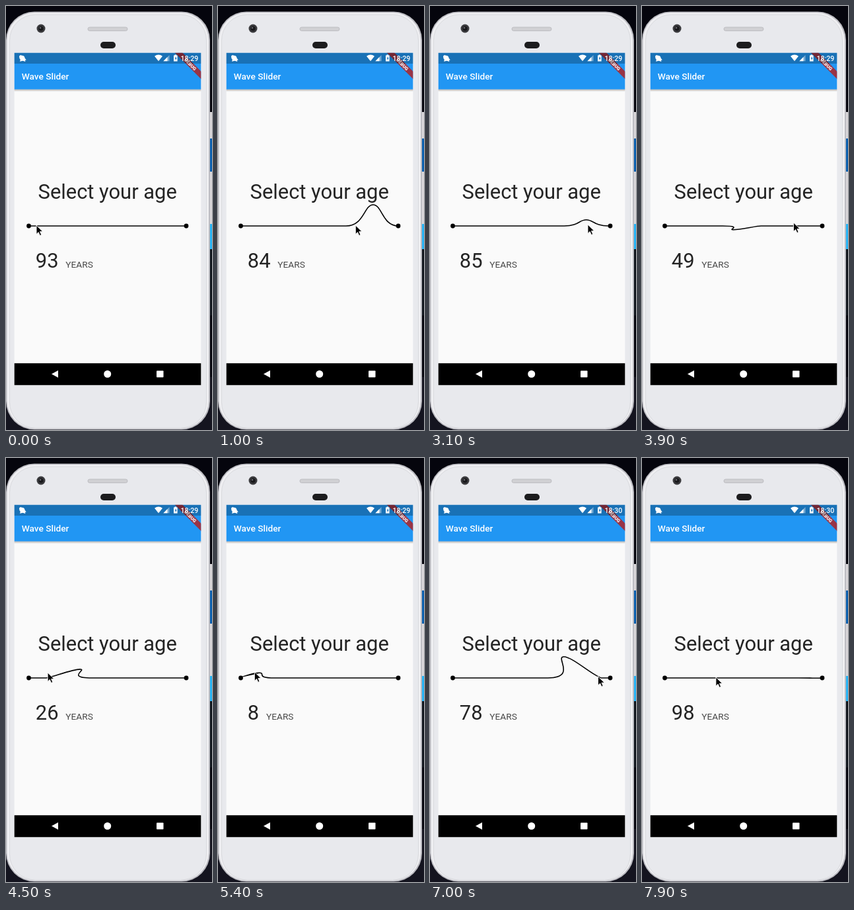
Write an HTML page that moves like this. It is 312 px wide and 640 px high and loops after 8 s.

```html
<!DOCTYPE html>
<html lang="en">
<head>
<meta charset="utf-8">
<title>Wave Slider</title>
<style>
  html, body { margin: 0; width: 100%; height: 100%; overflow: hidden; background: #05050d; }
  svg { display: block; }
  text { font-family: Roboto, "Noto Sans", sans-serif; }
</style>
</head>
<body>
<svg width="312" height="640" viewBox="0 0 312 640">
  <defs>
    <linearGradient id="shade" x2="0" y2="1">
      <stop stop-color="#000" stop-opacity=".3"/>
      <stop offset="1" stop-color="#000" stop-opacity="0"/>
    </linearGradient>
    <clipPath id="screen"><path d="M12.700 70.700h282.600v501.600H12.700z"/></clipPath>
  </defs>

  <!-- desktop and side buttons -->
  <path fill="#05050d" d="M0 0h312v640H0z"/>
  <path fill="#14141f" d="M0 560h312v80H0z"/>
  <path fill="#10151c" d="M306 367h6v100h-6z"/>
  <path fill="#0b5fae" d="M306 200h6v50h-6z"/>
  <path fill="#27b4f5" d="M306 329h6v38h-6z"/>
  <path fill="#d9d6d9" d="M306 160h6v40h-6zM306 250h6v79h-6z"/>

  <!-- phone body -->
  <rect y="8.500" width="309" height="631" rx="43" fill="#bcbcc2"/>
  <rect x="1.500" y="10" width="305.500" height="628" rx="42" fill="#efeff2"/>
  <rect x="5.500" y="13" width="298" height="624" rx="39" fill="#e8e9ed" stroke="#d9dade"/>
  <circle cx="53" cy="34" r="6.500" fill="#3a3a3d"/>
  <circle cx="53" cy="34" r="3.600" fill="#18181b"/>
  <circle cx="52" cy="33" r="1.300" fill="#65656c"/>
  <rect x="124" y="32" width="60" height="5.500" rx="2.700" fill="#d0d0d3" stroke="#b7b7bb" stroke-width=".8"/>
  <rect x="143" y="54" width="23" height="10" rx="5" fill="#1c1c1e"/>

  <!-- app, with the translucent status bar above the ribbon -->
  <g clip-path="url(#screen)">
    <path fill="#fafafa" d="M12 70h284v503H12z"/>
    <path fill="url(#shade)" d="M12 125.500h284v4H12z"/>
    <path fill="#2196f3" d="M12 70h284v55.700H12z"/>
    <g transform="translate(295 71) rotate(45)">
      <path fill="#b71c1c" fill-opacity=".8" d="M-40 19.200h80v8.200h-80z"/>
      <text x="1" y="25.800" font-size="7" font-weight="900" text-anchor="middle" fill="#fff">DEBUG</text>
    </g>
    <path fill-opacity=".25" d="M12 70h284v17H12z"/>
    <path d="M12 539.200h284V573H12z"/>
  </g>

  <!-- status and navigation icons -->
  <g fill="#fff">
    <path d="M20 75.500l2-1.500 2 .7q4-.2 4.600 4l2.200 2.800-2 .2.600 2.300-4-1.200-4.400 1 .800-2.800q-2-2-1.800-5.500z"/>
    <path d="M225 75.800q6-4.600 12 0l-6 7.400z"/>
    <path fill-opacity=".4" d="M247.500 74v9.200h-9.200z"/>
    <path d="M244.500 77v6.200h-6.200z"/>
    <path d="M254 74.500h1.500v-1h2.600v1h1.500v9H254z"/>
    <path fill="#1a71b8" d="M257.500 76l-2 3.500h1.200v2.500l2-3.500h-1.200z"/>
    <text id="clock" x="264.500" y="83" font-size="10.500" font-weight="500">18:29</text>
    <text x="23.700" y="111.300" font-size="13.700" font-weight="500">Wave Slider</text>
    <path d="M79 550v11l-10-5.500z"/>
    <circle cx="153.700" cy="555.500" r="5.500"/>
    <rect x="228" y="550.500" width="10.500" height="10" rx=".8"/>
  </g>

  <g fill="#242424">
    <text x="153.700" y="290.600" font-size="30.900" text-anchor="middle">Select your age</text>
    <text x="44.800" y="394.800" font-size="30.900"><tspan id="age">93</tspan><tspan dx="10.800" font-size="13.700" fill="#484848">YEARS</tspan></text>
  </g>

  <circle cx="34.500" cy="332" r="3.400"/>
  <circle cx="273" cy="332" r="3.400"/>
  <path id="wave" fill="none" stroke="#000" stroke-width="1.600"/>
  <path id="cursor" d="M0 0v13.500l3.200-3 2.200 5 2.300-1-2.200-4.900h4.300z" stroke="#fff" stroke-width=".9"/>
</svg>

<script>
  const LOOP = 8000, LEFT = 34, RIGHT = 273, BASE = 332, HEIGHT = 32;
  const LAG = 100, BEND = 13.7, MAX_BEND = 17;

  // turning points of the pointer: time, x
  const turns = [
    [0, 46], [900, 235], [1200, 130], [2000, 130], [3100, 239], [3500, 120], [3920, 230],
    [4680, 38], [4950, 106], [5310, 44], [5900, 241], [6280, 266], [6650, 150],
    [7100, 268], [7250, 268], [LOOP, 105]
  ];
  // button down and up times
  const drags = [[100, 1350], [3000, 3750], [4357, 5320], [5600, 7250]];

  const $ = id => document.getElementById(id);
  const wave = $('wave'), cursor = $('cursor'), age = $('age'), clock = $('clock');
  const clamp = (v, lo = LEFT, hi = RIGHT) => Math.max(lo, Math.min(hi, v));
  const ease = p => (1 - Math.cos(Math.PI * p)) / 2;

  function pointerX(t) {
    const i = Math.max(1, turns.findIndex(k => k[0] >= t));
    const [t0, x0] = turns[i - 1], [t1, x1] = turns[i];
    return x0 + (x1 - x0) * ease(clamp((t - t0) / (t1 - t0), 0, 1));
  }

  // the hand drifts up mid-loop and back
  const pointerY = t => 331 - 8.5 * Math.exp(-(((t - 5100) / 1400) ** 2));

  function slider(t) {
    const drag = drags.filter(d => d[0] <= t).pop();
    if (!drag) return { x: LEFT + 0.93 * (RIGHT - LEFT), lift: 0, bend: 0 };
    const [down, up] = drag;
    const held = Math.min(t, up);
    const x = clamp(pointerX(held - LAG));
    const step = x - clamp(pointerX(held - 2 * LAG));
    const bend = MAX_BEND * clamp(step / 30, -1, 1) ** 3;
    const s = (t - up) / 1000;
    const lift = s < 0
      ? Math.min(1, (t - down) / 350)
      : Math.exp(-7 * s) * Math.cos(14 * s);
    return { x, lift, bend };
  }

  function waveLine({ x, lift, bend }) {
    const top = BASE - HEIGHT * lift;
    const half = BEND * (0.75 + 0.25 * lift);
    const a = clamp(x - half), b = clamp(x + half);
    const start = clamp(x - 3 * half), end = clamp(x + 3 * half);
    return `M${LEFT} ${BASE}H${start}` +
      `C${a + bend} ${BASE} ${a - bend} ${top} ${clamp(x - bend)} ${top}` +
      `C${b - bend} ${top} ${b + bend} ${BASE} ${end} ${BASE}H${RIGHT}`;
  }

  function draw() {
    const t = performance.now() % LOOP;
    const s = slider(t);
    wave.setAttribute('d', waveLine(s));
    cursor.setAttribute('transform', `translate(${pointerX(t)} ${pointerY(t)})`);
    age.textContent = Math.round((s.x - LEFT) / (RIGHT - LEFT) * 100);
    clock.textContent = t < 5800 ? '18:29' : '18:30';
    requestAnimationFrame(draw);
  }
  draw();
</script>
</body>
</html>
```
